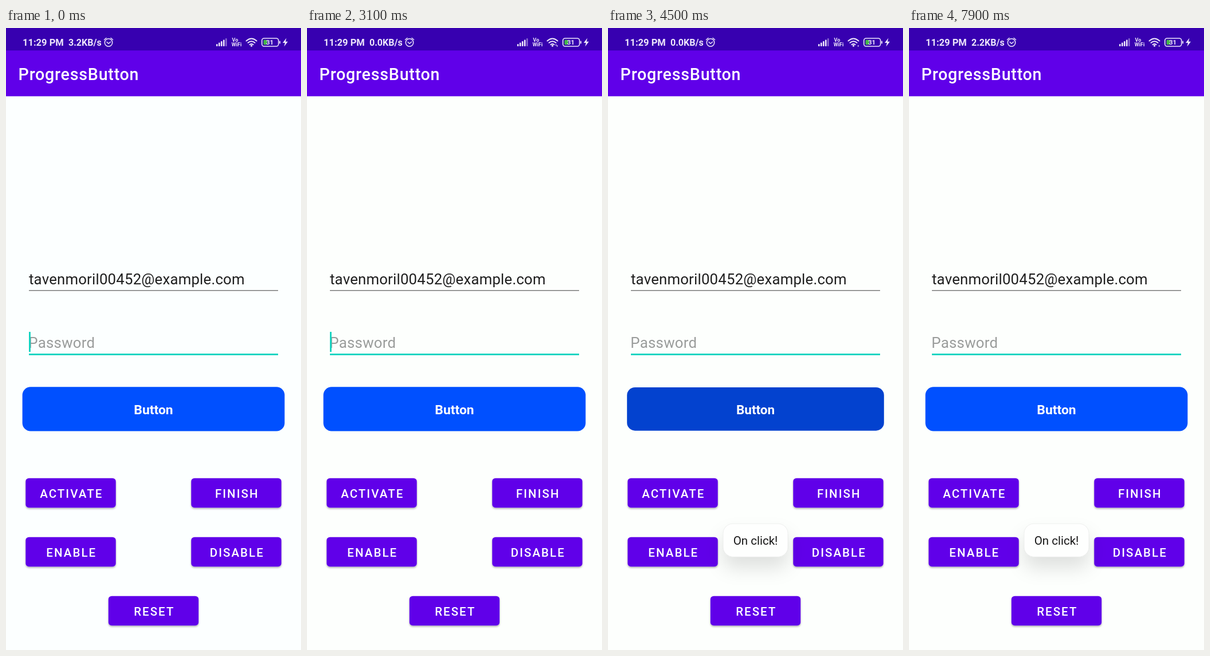
An HTML page for the animation above (8000 ms loop, 515x1087 px).

```html
<!DOCTYPE html>
<html lang="en">
<head>
<meta charset="utf-8">
<title>ProgressButton</title>
<style>
  html, body { margin: 0; width: 100%; height: 100%; overflow: hidden; background: #fdfffd; }
  svg { display: block; width: 100vw; height: 100vh; font-family: Roboto, "Noto Sans", sans-serif; }
  .mid { text-anchor: middle; }
  .status { fill: #eee8fb; font-weight: 700; }
  .line { fill: none; stroke: #eee8fb; stroke-linecap: round; stroke-linejoin: round; }
  .label { fill: #fff; font-size: 20.5px; font-weight: 500; letter-spacing: 2.05px; }
</style>
</head>
<body>
<svg viewBox="0 0 515 1087">
  <defs>
    <filter id="lift" x="-10%" y="-20%" width="120%" height="150%">
      <feDropShadow dx="0" dy="2" stdDeviation="1.6" flood-color="#000" flood-opacity=".3"/>
    </filter>
    <filter id="float" x="-60%" y="-80%" width="220%" height="300%">
      <feDropShadow dx="0" dy="19" stdDeviation="16" flood-color="#000" flood-opacity=".12"/>
    </filter>
  </defs>

  <rect id="page" width="515" height="1087"/>
  <rect width="515" height="119.3" fill="#6000e9"/>
  <rect width="515" height="39.3" fill="#3700b0"/>

  <g class="status">
    <text x="29" y="31" font-size="16.500">11:29 PM</text>
    <text id="speed" x="109" y="31" font-size="16"></text>
    <g class="line" stroke-width="1.5">
      <circle cx="179" cy="25.5" r="6.7"/>
      <path d="M171.5 20.5l3.5-3M186.5 20.5l-3.5-3M176 24.5l3 2.7l3.5-3"/>
    </g>
    <g id="signal"></g>
    <text class="mid" x="400" y="23.5" font-size="9">Vo</text>
    <text class="mid" x="402.5" y="32.3" font-size="9">WiFi</text>
    <g class="line" stroke-width="2">
      <path d="M419.5 22.5q9-8 18 0M422.5 25.8q6-5 12 0M425.5 29q3-2.5 6 0"/>
    </g>
    <circle cx="428.5" cy="31" r="1.7"/>
    <path id="up" d="M433.5 30.5l1.3-2.5l1.3 2.5z"/>
    <path id="down" d="M435.5 30.5h2.6l-1.3 2.8z"/>
    <rect class="line" x="446.7" y="18" width="29" height="14" rx="4" stroke-width="1.6"/>
    <rect x="449.5" y="20.7" width="6.5" height="8.6" rx="1.5" fill="#43b649"/>
    <rect x="477.2" y="22.5" width="1.8" height="5" rx=".9"/>
    <text class="mid" x="460.5" y="29.2" font-size="11.5">31</text>
    <path d="M489.5 17.5l-6.5 8.5h4l-1.5 6.5l6.5-8.7h-4z"/>
  </g>

  <text x="21.6" y="91" font-size="28.6" font-weight="500" letter-spacing=".78" fill="#fff">ProgressButton</text>

  <text x="40" y="447.5" font-size="25.75" letter-spacing=".2" fill="#1f1f1f">tavenmoril00452@example.com</text>
  <rect x="40" y="458" width="435" height="1.43" fill="#757575"/>
  <text x="39.3" y="558.5" font-size="25.75" letter-spacing=".3" fill="#9a9c9b">Password</text>
  <rect x="40" y="569" width="435" height="2.86" fill="#14d3c0"/>
  <rect id="cursor" x="40" y="531" width="2.86" height="35" fill="#14d3c0"/>

  <g id="main">
    <rect id="mainFace" x="28.6" y="627.2" width="457.8" height="77.25" rx="14.3"/>
    <text class="mid" x="257.5" y="675" font-size="22.9" font-weight="700" fill="#fff">Button</text>
  </g>

  <g id="actions"></g>

  <g id="toast">
    <rect x="-56.5" y="-29" width="113" height="58" rx="17" fill="#fefffe" filter="url(#float)"/>
    <rect x="-56.5" y="-29" width="113" height="58" rx="17" fill="none" stroke="#000" stroke-opacity=".06"/>
    <text class="mid" y="8" font-size="20.5" fill="#161616">On click!</text>
  </g>
</svg>
<script>
const LOOP = 8000, STEP = 100;
const $ = id => document.getElementById(id);
const clamp = v => Math.min(1, Math.max(0, v));
const ramp = (t, start, length) => clamp((t - start) / length);

function add(parent, tag, attrs, text = '') {
  const node = document.createElementNS('http://www.w3.org/2000/svg', tag);
  for (const key in attrs) node.setAttribute(key, attrs[key]);
  node.textContent = text;
  parent.append(node);
}

for (let i = 0; i < 5; i++) {
  const h = 4 + i * 2.5;
  add($('signal'), 'rect', { x: 367 + i * 4, y: 32 - h, width: 2.6, height: h, rx: 1, opacity: i < 4 ? 1 : .45 });
}

const actions = [['ACTIVATE', 34.3, 0], ['FINISH', 323.3, 0], ['ENABLE', 34.3, 1], ['DISABLE', 323.3, 1], ['RESET', 178.8, 2]];
for (const [name, x, row] of actions) {
  const y = 786.7 + 103 * row;
  add($('actions'), 'rect', { x, y, width: 157.4, height: 51.5, rx: 5.7, fill: '#6000e9', filter: 'url(#lift)' });
  add($('actions'), 'text', { x: x + 80, y: y + 34, class: 'mid label' }, name);
}

const presses = [[3430, 3740], [4260, 6460]];
const toasts = [[3830, 5710], [6530, 8430]];

function drawButton(t) {
  const depth = Math.max(...presses.map(([down, up]) => ramp(t, down, 120) - ramp(t, up, 120)));
  const scale = 1 - .02 * depth;
  $('main').setAttribute('transform', `translate(257.5 665.85) scale(${scale}) translate(-257.5 -665.85)`);
  $('mainFace').setAttribute('fill', `rgb(${3 * depth} ${80 - 14 * depth} ${255 - 48 * depth})`);
}

// Springs in with a small overshoot, then shrinks and fades away.
function drawToast(t) {
  const [start, end] = toasts.findLast(([begin]) => t >= begin) || [Infinity, Infinity];
  const age = (t - start) / 1000;
  const leave = ramp(t, end, 300);
  const shown = age >= 0 && leave < 1;
  $('toast').style.display = shown ? '' : 'none';
  if (!shown) return;
  const scale = 1 - .5 * Math.exp(-10.7 * age) * Math.cos(11.8 * age) - .117 * leave;
  $('toast').setAttribute('transform', `translate(257.5 ${895.2 + 155 * (1 - scale)}) scale(${scale})`);
  $('toast').setAttribute('opacity', clamp(age / .07) * (1 - leave));
}

function draw(time) {
  const t = Math.floor(time % LOOP / STEP) * STEP;
  const blink = (t + 134) % 1006;
  $('page').setAttribute('fill', t < 200 ? '#fcffff' : '#fdfffd');
  $('cursor').style.display = blink < 503 ? '' : 'none';
  $('speed').textContent = (t < 2400 ? '3.2' : t < 6300 ? '0.0' : '2.2') + 'KB/s';
  $('up').style.display = t >= 2400 && t < 4500 ? '' : 'none';
  $('down').style.display = t >= 2400 ? '' : 'none';
  drawButton(t);
  drawToast(t);
}

const origin = performance.now();
function tick() {
  draw(performance.now() - origin);
  requestAnimationFrame(tick);
}
tick();
</script>
</body>
</html>
```
